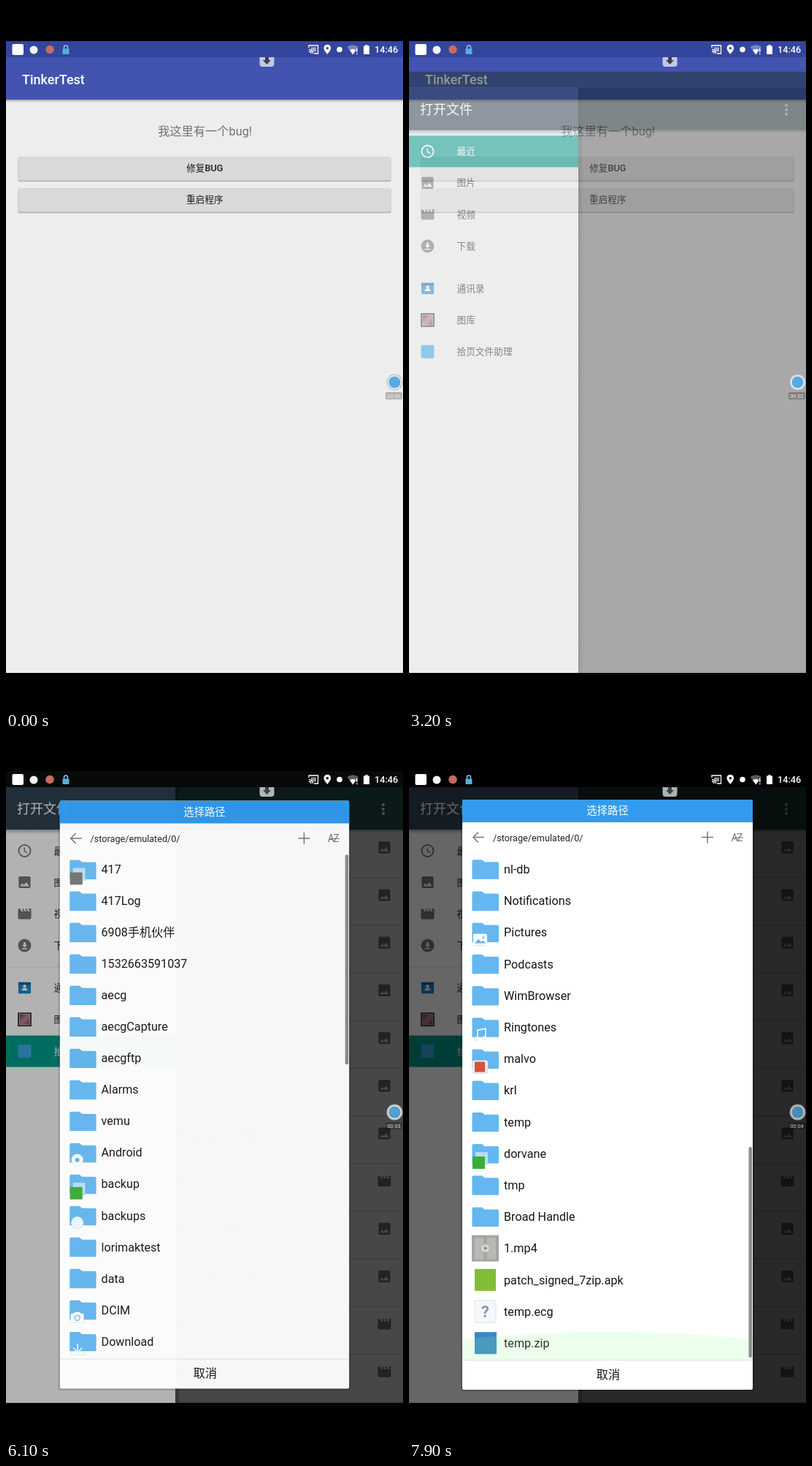
An HTML page for the animation above (8000 ms loop, 544 by 960 pixels).

```html
<!DOCTYPE html>
<html lang="zh-CN">
<head>
<meta charset="utf-8">
<title>TinkerTest</title>
<style>
  html, body { margin: 0; width: 100%; height: 100%; overflow: hidden; background: #000; }
  svg { display: block; width: 100vw; height: 100vh; }
  text { font-family: Roboto, "Noto Sans CJK SC", "Noto Sans CJK", sans-serif; }
  .badge { filter: drop-shadow(0 0 .7px #8aa); }
</style>
</head>
<body>
<svg id="stage" viewBox="0 0 544 960"></svg>
<script>
const $ = id => document.getElementById(id);
const rect = (x, y, w, h, fill, more = '') =>
  `<rect x="${x}" y="${y}" width="${w}" height="${h}" fill="${fill}" ${more}/>`;
const circle = (x, y, r, fill, more = '') =>
  `<circle cx="${x}" cy="${y}" r="${r}" fill="${fill}" ${more}/>`;
const path = (d, fill, more = '') => `<path d="${d}" fill="${fill}" ${more}/>`;
const line = (d, color, width = 1.5) =>
  path(d, 'none', `stroke="${color}" stroke-width="${width}"`);
// Text is placed by its vertical centre.
const text = (x, cy, size, str, fill, more = '') =>
  `<text x="${x}" y="${(cy + size * .36).toFixed(1)}" font-size="${size}" fill="${fill}" ${more}>${str}</text>`;
const group = (id, body, more = '') => `<g id="${id}" ${more}>${body}</g>`;
const at = (x, y, body) => `<g transform="translate(${x} ${y})">${body}</g>`;
const MIDDLE = 'text-anchor="middle" ', MEDIUM = 'font-weight="500" ';

// Icons are drawn on a 24-unit grid, centred on x, y.
const icon = (x, y, body) =>
  `<g transform="translate(${x} ${y}) scale(.9) translate(-12 -12)">${body}</g>`;
const imageIcon = c => path('M21 19V5a2 2 0 0 0-2-2H5a2 2 0 0 0-2 2v14a2 2 0 0 0 2 2h14a2 2 0 0 0 2-2zM8.5 13.5l2.5 3 3.5-4.5 4.5 6H5z', c);
const movieIcon = c => path('M18 4l2 4h-3l-2-4h-2l2 4h-3l-2-4H8l2 4H7L5 4H4a2 2 0 0 0-2 2v12a2 2 0 0 0 2 2h16a2 2 0 0 0 2-2V4z', c);
const clockIcon = c => circle(12, 12, 9, 'none', `stroke="${c}" stroke-width="2"`) + line('M11.8 7v5.6l4.4 2.7', c, 1.6);
const downloadIcon = c => circle(12, 12, 10, c) + path('M10.5 7h3v4H16l-4 4-4-4h2.5zM8 16h8v1.5H8z', '#fff');
const contactIcon = () => rect(2.5, 3.5, 19, 17, '#1e88c9', 'rx="1"') + rect(2.5, 3.5, 19, 4, '#136397') +
  circle(12, 9.5, 2.4, '#fff') + path('M7.5 16q0-4 4.5-4t4.5 4z', '#fff');
const galleryIcon = () => rect(1.5, 1.5, 21, 21, '#3b3437') + rect(4, 4, 16, 16, 'url(#photo)', 'stroke="#c9b9b9"');

const defs = `<defs>
  <linearGradient id="photo" x2="1" y2="1"><stop stop-color="#5b2b56"/><stop offset=".5" stop-color="#c08296"/><stop offset="1" stop-color="#70405c"/></linearGradient>
  <linearGradient id="shade" x2="0" y2="1"><stop stop-opacity=".3"/><stop offset="1" stop-opacity="0"/></linearGradient>
  <linearGradient id="edge"><stop stop-opacity=".3"/><stop offset="1" stop-opacity=".08"/></linearGradient>
  <clipPath id="listArea">${rect(73, 160, 398, 693, '#000')}</clipPath>
</defs>`;

function mainScreen() {
  const button = (y, label) =>
    rect(16.5, y + .8, 511, 33.5, '#b4b4b4', 'rx="2"') +
    rect(17, y, 510, 32.5, '#d9d9d9', 'rx="2" class="button"') +
    text(272.3, y + 15.8, 12.7, label, '#1c1c1c', MIDDLE + MEDIUM);
  return rect(0, 48, 544, 864, '#ededed') + rect(0, 48, 544, 22.5, '#34459d') +
    rect(0, 70, 544, 58, '#4254af') + rect(0, 128, 544, 4, 'url(#shade)') +
    text(22, 100.3, 18, 'TinkerTest', '#fff', MEDIUM) +
    text(272.5, 171.3, 16.3, '我这里有一个bug!', '#727272', MIDDLE) +
    button(206, '修复BUG') + button(249, '重启程序');
}

const drawerItems = [
  [157, '最近', clockIcon], [200, '图片', imageIcon], [243.3, '视频', movieIcon], [286.5, '下载', downloadIcon],
  [344.5, '通讯录', contactIcon], [387.7, '图库', galleryIcon],
  [431, '拾页文件助理', () => rect(2, 2, 20, 20, '#3aa5e3', 'rx="2"')]
];

function drawer() {
  const item = ([y, label, draw], iconColor, textColor) =>
    icon(25.5, y, draw(iconColor)) + text(65.5, y, 12.7, label, textColor);
  const selected = (id, entry) =>
    group(id, rect(0, entry[0] - 21.4, 232, 43, '#009a88') + item(entry, '#fff', '#fff'));
  return rect(232, 70, 6, 842, 'url(#edge)') + rect(0, 70, 232, 842, '#fff', 'id="drawerPanel"') +
    rect(0, 70, 232, 58, '#314355') + rect(0, 128, 232, 6, 'url(#shade)') +
    text(15, 99.8, 18, '打开文件', '#fff') + rect(0, 315.5, 232, 1, '#e4e4e4', 'id="drawerRule"') +
    drawerItems.map(entry => item(entry, '#757575', '#222')).join('') +
    selected('recentRow', drawerItems[0]) + selected('browserRow', drawerItems[6]);
}

function picker() {
  const names = { 6: '479c262ef83.png', 7: '4', 8: 'f66dd28b2d.png', 9: '66a8c781fb3.png', 10: '4', 11: '4' };
  const ends = { 6: 343, 8: 334, 9: 343 };
  let files = '', rules = '';
  for (let i = 0; i < 12; i++) {
    const y = 152.3 + i * 65.2;
    files += icon(518.5, y, (names[i] === '4' ? movieIcon : imageIcon)('#303030'));
    if (names[i]) files += text(ends[i] || 239.5, y, 14.5, names[i], '#0c0c0c', 'text-anchor="end"');
    rules += rect(232, y + 40.7, 312, 1, '#515151');
  }
  return rect(0, 48, 544, 950, '#666') + rect(0, 48, 544, 22, '#22332f') + rect(0, 70, 544, 58, '#102424') +
    rect(0, 128, 544, 5, 'url(#shade)') +
    [94, 100, 106].map(y => circle(517, y, 2, '#6b7776')).join('') +
    group('files', files) + group('rules', rules) +
    rect(540, 128, 4, 350, '#474747', 'id="pageThumb"') + drawer();
}

const folders = ['417', '417Log', '6908手机伙伴', '1532663591037', 'aecg', 'aecgCapture', 'aecgftp', 'Alarms', 'vemu',
  'Android', 'backup', 'backups', 'lorimaktest', 'data', 'DCIM', 'Download', 'ecgdata', 'Fonts', 'images', 'log',
  'Movies', 'Music', 'netlog', 'nl-db', 'Notifications', 'Pictures', 'Podcasts', 'WimBrowser', 'Ringtones', 'malvo',
  'krl', 'temp', 'dorvane', 'tmp', 'Broad Handle'];
const tile = color => rect(91, -2, 17, 17, '#b9def7') + rect(87, 4, 17, 17, color, 'rx="1"');
const badges = {
  417: tile('#747474'), backup: tile('#3aae36'), dorvane: tile('#3aae36'),
  malvo: rect(87, 2, 21, 18, '#eee9e6', 'rx="3"') + rect(90, 4, 14, 14, '#d6533c', 'rx="1"'),
  Android: circle(97, 10, 5.5, 'none', 'stroke="#fff" stroke-width="5"'),
  backups: circle(97, 10, 8.5, '#eef7fd'),
  DCIM: rect(88, 5, 18, 13, '#fff', 'rx="2"') + rect(93, 3, 8, 4, '#fff') + circle(97, 11, 3.5, '#fff', 'stroke="#64b7f0" stroke-width="1.3"'),
  Download: line('M97.5 3v12m-6-6l6 6 6-6M88 15v3h19v-3', '#fff'),
  Pictures: rect(88, 2, 19, 16, '#fff', 'rx="2"') + path('M90 15l5-6 4 4 3-2 3 4z', '#64b7f0') + circle(102, 7, 1.5, '#64b7f0'),
  Ringtones: line('M94 16V4l11-2v13', '#fff', 1.6) + circle(92, 16, 2.6, '#fff') + circle(103, 15, 2.6, '#fff')
};
const documents = [
  ['1.mp4', rect(86, -18, 37, 36, '#a5a5a3') + rect(90, -14, 12, 29, '#b8b8b5') + rect(107, -14, 12, 29, '#b8b8b5') +
    circle(104.5, 0, 5, '#ddd') + path('M103-3l5 3-5 3z', '#888')],
  ['patch_signed_7zip.apk', rect(90, -15, 29, 30, '#83bd35')],
  ['temp.ecg', rect(90, -15, 29, 30, '#f6f7fa', 'stroke="#dcdfe5"') + text(104.5, 0, 22, '?', '#8795bd', MIDDLE + 'font-weight="700"')],
  ['temp.zip', rect(90, -15, 30, 30, '#3d86c4')]
];

function dialog() {
  const folder = path('M86.5-11q0-2 2-2H100l3.5 3H121q2 0 2 2V13.5H86.5z', '#64b7f0');
  const badge = name => badges[name] ? `<g class="badge">${badges[name]}</g>` : '';
  const rows = [...folders.map(name => [name, folder + badge(name)]), ...documents];
  const list = rows.map(([name, art], i) =>
    at(0, (181.2 + i * 43.2).toFixed(1), art + text(130, 0, 16.2, name, '#151515'))).join('');
  return rect(71, 87, 402, 809, '#000', 'rx="3" opacity=".2"') + rect(73, 87, 398, 807, '#fff', 'rx="2"') +
    rect(73, 87, 398, 31, '#329bef') + text(272, 102, 14.4, '选择路径', '#fff', MIDDLE) +
    line('M103 138.5H88m7-7l-7 7 7 7M401 138.5h16m-8-8v16', '#777') +
    text(115, 139, 12.7, '/storage/emulated/0/', '#222') +
    text(441.5, 138.5, 14, 'A', '#777') + text(449, 138.5, 14, 'Z', '#777') + line('M445 139h13', '#777', 1) +
    `<g clip-path="url(#listArea)">${group('rows', list)}
      <ellipse id="glow" cx="272" cy="853" rx="290" ry="38" fill="#8f8" opacity="0"/></g>` +
    rect(465.5, 161, 4.5, 288, '#8d8d8d', 'id="listThumb" rx="2"') +
    rect(73, 853, 398, 1, '#e2e2e2') + text(273, 873, 16.2, '取消', '#151515', MIDDLE);
}

function statusIcons() {
  return rect(8.5, 52, 15.5, 15, '#fff', 'rx="2"') + circle(38, 60, 5.5, '#f4f4f4') + circle(60, 59.5, 5.8, '#c46e5c') +
    rect(77.5, 58.5, 9, 7.5, '#52b0dc', 'rx="1"') + line('M79.5 59v-2.5a2.5 2.5 0 0 1 5 0V59', '#82c8e6') +
    line('M415 57v-3h12.5v11H422M415 59.5a5.5 5.5 0 0 1 5.5 5.5M415 62a3 3 0 0 1 3 3', '#fff', 1.3) +
    rect(418, 56.5, 7, 6, '#fff', 'opacity=".55"') +
    path('M440.3 66q-4.8-5.5-4.8-8.5a4.8 4.8 0 0 1 9.6 0q0 3-4.8 8.5zm0-10a1.7 1.7 0 1 0 .01 0z', '#fff') +
    circle(457, 59.5, 3.8, '#fff') +
    path('M467.5 56q8-5.5 15.5 0l-7.7 10.5z', '#fff', 'opacity=".35"') + path('M471 60.5q4.3-2.8 8.5 0l-4.2 6z', '#fff') +
    rect(480, 58, 1.5, 5, '#fff') + rect(480, 64.5, 1.5, 1.7, '#fff') +
    path('M490 54.5h2.5V53h3v1.5H498V66h-8z', '#fff') +
    text(505, 59.8, 12.7, '14:46', '#fff', MEDIUM);
}

const floatingArrow = path('M347.5 70h20v9q0 4-4 4h-12q-4 0-4-4z', '#fff', 'opacity=".68"') +
  path('M355 70h5v4h3l-5.5 6-5.5-6h3z', '#39424d');
const recorder = circle(532.5, 514.5, 11, '#bdbdbd') + circle(532.5, 514.5, 9.8, '#ecf1f3') +
  circle(532.5, 514.5, 8, '#56abe6') + rect(520, 528, 23, 10, 'rgba(0,0,0,.25)', 'rx="2"') +
  text(531.5, 533.2, 7.5, '00:00', '#f0f0f0', MIDDLE + 'id="counter"');

$('stage').innerHTML = defs + mainScreen() + group('picker', picker()) +
  rect(0, 70, 544, 842, '#000', 'id="dim"') + rect(0, 48, 544, 22, '#000', 'id="statusDim"') +
  floatingArrow + group('dialog', dialog()) + statusIcons() + group('recorder', recorder) +
  rect(0, 0, 544, 48, '#000') + rect(0, 912, 544, 48, '#000');

const LOOP = 8000, STEP = 100, SCROLL = 992.6;
const progress = (t, from, to) => Math.min(1, Math.max(0, (t - from) / (to - from)));
const easeOut = (p, power) => 1 - (1 - p) ** power;
const easeInOut = p => p < .5 ? 2 * p * p : 1 - 2 * (1 - p) ** 2;
const set = (id, name, value) => $(id).setAttribute(name, value);
const show = (id, on) => set(id, 'visibility', on ? 'inherit' : 'hidden');
const buttons = document.querySelectorAll('.button');

function draw(t) {
  const tint = progress(t, 300, 1700) - progress(t, 2100, 3100);
  buttons.forEach(b => b.setAttribute('fill', `rgb(${217 + 2 * tint},${217 + 3 * tint},${217 - 12 * tint})`));

  const slide = 69 * (1 - easeOut(progress(t, 3100, 4150), 5));
  const white = 238 + 17 * progress(t, 3200, 3700);
  set('picker', 'transform', `translate(0 ${slide.toFixed(2)})`);
  set('picker', 'opacity', easeOut(progress(t, 3100, 3440), 2));
  set('drawerPanel', 'fill', `rgb(${white},${white},${white})`);
  show('files', t >= 3500);
  show('drawerRule', t >= 3500);
  set('rules', 'opacity', progress(t, 3700, 4200));
  set('pageThumb', 'opacity', t < 3500 ? 0 : 1 - progress(t, 4200, 4700));
  show('recentRow', t < 5400);
  show('browserRow', t >= 5400);

  const dim = progress(t, 5700, 6500);
  set('dim', 'opacity', .6 * dim);
  set('recorder', 'opacity', 1 - .25 * dim);
  set('statusDim', 'opacity', progress(t, 5700, 6200));
  const open = easeOut(progress(t, 5700, 6200), 2);
  const scale = .9 + .1 * open;
  set('dialog', 'opacity', open);
  set('dialog', 'transform', `translate(${272 * (1 - scale)} ${490 * (1 - scale)}) scale(${scale})`);

  const scroll = easeInOut(progress(t, 6500, 7700));
  set('rows', 'transform', `translate(0 ${-SCROLL * scroll})`);
  set('listThumb', 'y', 161 + 401 * scroll);
  set('glow', 'opacity', .16 * progress(t, 7600, 7800));

  const seconds = [1800, 3000, 4700, 7000].filter(mark => t >= mark).length;
  $('counter').textContent = '00:0' + seconds;
}

const start = performance.now();
function tick() {
  const t = (performance.now() - start) % LOOP;
  draw(t < 300 ? 0 : Math.floor(t / STEP) * STEP);
  requestAnimationFrame(tick);
}
tick();
</script>
</body>
</html>
```
